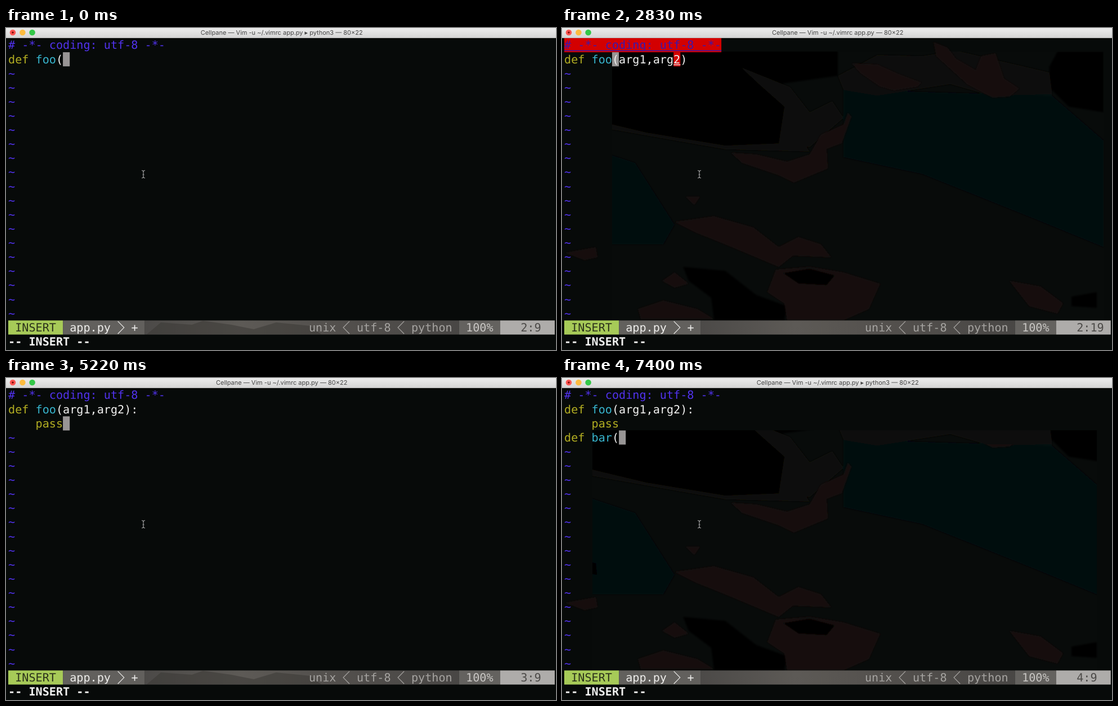
An HTML page that plays this animation: 977 px wide and 573 px high, repeating every 8 s.

```html
<!DOCTYPE html>
<html lang="en">
<head>
<meta charset="utf-8">
<title>Editor session</title>
<style>
html, body { margin: 0; width: 100%; height: 100%; overflow: hidden; background: #070a09; }
svg { display: block; width: 977px; height: 573px; }
text { white-space: pre; text-rendering: geometricPrecision; }
.mono { font: 20.156px "DejaVu Sans Mono", monospace; }
.title { font: 11px Inter, "DejaVu Sans", sans-serif; fill: #454545; text-anchor: middle; }
</style>
</head>
<body>
<svg viewBox="0 0 977 573">
  <defs>
    <linearGradient id="bar" x2="0" y2="1">
      <stop stop-color="#ececec"/><stop offset="1" stop-color="#d4d4d4"/>
    </linearGradient>
    <linearGradient id="mid">
      <stop stop-color="#4c4a48"/><stop offset=".3" stop-color="#5d5a56"/>
      <stop offset=".6" stop-color="#53504d"/><stop offset="1" stop-color="#494745"/>
    </linearGradient>
    <filter id="soft"><feGaussianBlur stdDeviation="1.5"/></filter>
    <clipPath id="area"><rect id="clip"/></clipPath>
  </defs>
  <rect width="977" height="573" fill="#070a09"/>

  <g id="sky" clip-path="url(#area)">
    <rect width="977" height="573" fill="#080b0a"/>
    <g filter="url(#soft)">
      <path fill="#05070b" d="M500 110L870 120 962 200V390L840 340 640 260 500 230ZM10 200L130 240 200 350 180 385H10Z"/>
      <path fill="#0d0a07" d="M0 145L150 182 290 205 430 205 440 220 290 216 0 165ZM490 85L560 48 640 50 700 40 870 80V118L760 120 690 100 560 120 500 110Z"/>
      <path fill="#020303" d="M0 18H490V85L385 100 395 140 390 205 290 209 150 186 0 150ZM865 70L880 42H962V150L900 140 870 110Z"/>
      <path fill="#0e0b08" d="M318 70L350 100 395 140 385 205 440 212 500 160 480 130 440 150 405 105Z"/>
      <path fill="#020303" d="M215 425L290 432 345 475 400 495 395 520H270L265 480 225 450ZM20 320L60 330 62 350 30 345Z"/>
    </g>
  </g>
  <g id="clouds" fill="#12100d" filter="url(#soft)">
    <path d="M515 63L560 65 598 82 638 97 632 104 590 111 565 104 530 80Z"/>
    <path d="M660 25L685 35 700 55 735 75 745 50 770 45 785 90 812 108 795 122 765 124 720 100 665 50Z"/>
    <path d="M300 222L345 225 400 238 440 225 460 190 500 172 508 150 514 158 497 205 470 215 472 250 412 275 385 262 320 240Z"/>
    <path d="M200 345L270 335 340 355 385 390 420 372 460 385 478 408 410 405 385 425 290 385 240 365Z"/>
    <path d="M380 430L440 425 500 435 565 455 545 500 500 520H400L395 490 365 470Z"/>
    <path d="M178 450L200 435 225 455 200 462ZM795 450L850 460 890 490 880 508 830 495ZM135 500L180 485 240 500 270 518H140Z"/>
    <path d="M5 400L60 390 63 408 40 413ZM220 300L245 300 235 315Z"/>
    <path fill="#040605" d="M392 436L440 428 485 440 470 458 420 455ZM905 478L950 470V498L905 495Z"/>
  </g>

  <rect width="977" height="18" fill="url(#bar)"/>
  <rect y="17" width="977" height="1" fill="#b9b9b9"/>
  <circle cx="12" cy="8" r="5.3" fill="#fc5753"/><circle cx="12" cy="8" r="1.8" fill="#7e0a05"/>
  <circle cx="29.4" cy="8" r="5.3" fill="#fdbc40"/>
  <circle cx="46.6" cy="8" r="5.3" fill="#33c748"/>
  <text id="title" class="title" x="489.7" y="12"></text>

  <g id="status" class="mono"></g>
  <g id="screen" class="mono"></g>
  <path d="M241 253.5q3 0 3 2.5v8.500q0 2.500-3 2.500M247 253.500q-3 0-3 2.500M244 264.500q0 2.500 3 2.500M242.500 261h3" fill="none" stroke="#a5a5a5" stroke-width="1.100"/>
</svg>
<script>
const $ = id => document.getElementById(id);
const LEFT = 4, TOP = 18, CELL = 12.135, ROW = 25.12, LOOP = 8000;
const WHITE = '#f1f1f0', YELLOW = '#b3ae22', CYAN = '#38b6cf', BLUE = '#5132ee', RED = '#d30000', DIM = '#a5a3a0';
const HEAD = '# -*- coding: utf-8 -*-', FOO = 'def foo(arg1,arg2):', PASS = '    pass';

const colX = col => LEFT + col * CELL;
const rowY = row => TOP + row * ROW;
const esc = s => s.replace(/&/g, '&amp;').replace(/</g, '&lt;');
const put = (col, row, s, fill, extra = '') =>
  `<text x="${colX(col)}" y="${rowY(row) + 19.4}" fill="${fill}" ${extra}>${esc(s)}</text>`;
const block = (col, row, n, fill) =>
  `<rect x="${colX(col)}" y="${rowY(row)}" width="${n * CELL}" height="${ROW}" fill="${fill}"/>`;
const rule = (col, row, n, fill) =>
  `<rect x="${colX(col)}" y="${rowY(row) + 21.6}" width="${n * CELL}" height="1.4" fill="${fill}"/>`;

// Each step: time, lines below the header, and any settings that change and then persist.
const steps = [
  [0, ['def foo('], { job: 1, lint: '', sky: 'flat', match: 0 }],
  [210, ['def foo(a']],
  [400, ['def foo(ar']],
  [590, ['def foo(arg']],
  [780, ['def foo(arg1']],
  [1310, ['def foo(arg1,'], { lint: 'arg1', sky: 'thin' }],
  [1490, ['def foo(arg1,a']],
  [1670, ['def foo(arg1,ar']],
  [1850, ['def foo(arg1,arg']],
  [2030, ['def foo(arg1,arg2']],
  [2480, ['def foo(arg1,arg2'], { lint: 'arg2', job: 0 }],
  [2650, ['def foo(arg1,arg2)']],
  [2830, ['def foo(arg1,arg2)'], { match: 1, sky: 'full', box: [89, 42, 962] }],
  [3370, ['def foo(arg1,arg2)'], { match: 0, job: 1 }],
  [3580, [FOO], { sky: 'flat' }],
  [4140, [FOO], { lint: 'tail', job: 0 }],
  [4290, [FOO], { job: 1 }],
  [4440, [FOO, '    ']],
  [4620, [FOO, '    p']],
  [4770, [FOO, '    pas']],
  [4920, [FOO, PASS]],
  [5220, [FOO, PASS], { lint: '', job: 0 }],
  [5400, [FOO, PASS], { job: 1 }],
  [5940, [FOO, PASS, ''], { sky: 'full', box: [4, 93, 950] }],
  [6090, [FOO, PASS, 'd']],
  [6240, [FOO, PASS, 'de'], { box: [16, 93, 950] }],
  [6450, [FOO, PASS, 'def']],
  [6650, [FOO, PASS, 'def ']],
  [6830, [FOO, PASS, 'def ba']],
  [7010, [FOO, PASS, 'def bar'], { sky: 'thin' }],
  [7400, [FOO, PASS, 'def bar('], { sky: 'full', box: [54, 93, 950] }]
];
let kept = {};
const states = steps.map(([at, lines, set]) => (kept = { ...kept, ...set, at, lines }));

function codeLine(s, row) {
  let out = '', col = 0;
  const add = (part, fill) => { if (part) out += put(col, row, part, fill); col += part.length; };
  const def = /^(def)( ?)(\w*)(.*)$/.exec(s);
  if (def) {
    add(def[1], YELLOW);
    add(def[2], WHITE);
    add(def[3], CYAN);
    add(def[4], WHITE);
  } else add(s, s.trim() === 'pass' ? YELLOW : WHITE);
  const gap = s.length - s.trimEnd().length;
  return out + (gap ? put(s.length - gap, row, '_'.repeat(gap), '#3b2bb4') : '');
}

function marks(lint) {
  if (!lint) return '';
  if (lint === 'tail') return block(12, 1, 7, RED) + rule(18, 1, 1, WHITE);
  const col = lint === 'arg1' ? 11 : 16;
  return block(0, 0, HEAD.length, RED) + rule(0, 0, HEAD.length, '#3a18ae') +
    block(col, 1, 1, RED) + rule(col, 1, 1, WHITE);
}

function statusLine(pos, flat) {
  const chevron = (col, dir) => {
    const x = colX(col) + (dir > 0 ? .5 : 11.5), y = rowY(20) + 1.5;
    return `<path d="M${x} ${y}l${11 * dir} 11.200l${-11 * dir} 11.200" fill="none" stroke="${dir > 0 ? '#e4e3e1' : DIM}" stroke-width="1.3"/>`;
  };
  const shade = flat ? '<path d="M250 545L275 524 330 528 350 521 400 528 440 536 480 524 540 530 560 545Z" fill="#3b3936" opacity=".55"/>' : '';
  return block(0, 20, 8, '#a7ca58') + block(8, 20, 12, '#62605d') + block(20, 20, 46, 'url(#mid)') + shade +
    block(66, 20, 6, '#64625f') + block(72, 20, 8, '#aeacaa') +
    put(1, 20, 'INSERT', '#2c321b') + put(9, 20, 'app.py', '#eeedeb') + chevron(16, 1) + put(18, 20, '+', '#eeedeb') +
    put(44, 20, 'unix', DIM) + chevron(49, -1) + put(51, 20, 'utf-8', DIM) + chevron(57, -1) +
    put(59, 20, 'python', DIM) + put(67, 20, '100%', '#c9c7c4') + put(75, 20, pos, '#4c4a48') +
    put(0, 21, '-- INSERT --', WHITE, 'font-weight="700"');
}

function draw(s) {
  const n = s.lines.length, end = s.lines[n - 1].length;
  let out = marks(s.lint);
  out += s.match ? block(7, 1, 1, '#989595') : block(end, n, 1, '#989595');
  out += put(0, 0, HEAD, /^arg/.test(s.lint) ? '#3a18ae' : BLUE);
  s.lines.forEach((line, i) => out += codeLine(line, i + 1));
  for (let row = n + 1; row < 20; row++) out += put(0, row, '~', BLUE);
  $('screen').innerHTML = out;
  $('status').innerHTML = statusLine(`${n + 1}:${end + 1}`, s.sky === 'flat');
  $('title').textContent = `Cellpane — Vim -u ~/.vimrc app.py ${s.job ? '▸ python3 ' : ''}— 80×22`;

  const [x, y, right] = s.box || [0, 0, 0];
  Object.entries({ x, y, width: right - x, height: 541 - y }).forEach(([k, v]) => $('clip').setAttribute(k, v));
  $('sky').style.display = s.sky === 'full' ? '' : 'none';
  $('clouds').style.display = s.sky === 'flat' ? 'none' : '';
  // Late in the session the sky only shows below the code.
  $('clouds').style.clipPath = s.lines.length > 2 ? 'polygon(0 93px, 977px 93px, 977px 573px, 0 573px)' : '';
}

let shown;
function frame(now) {
  const t = now % LOOP;
  const state = states.findLast(s => s.at <= t) || states[0];
  if (state !== shown) draw(shown = state);
  requestAnimationFrame(frame);
}
frame(performance.now());
</script>
</body>
</html>
```
